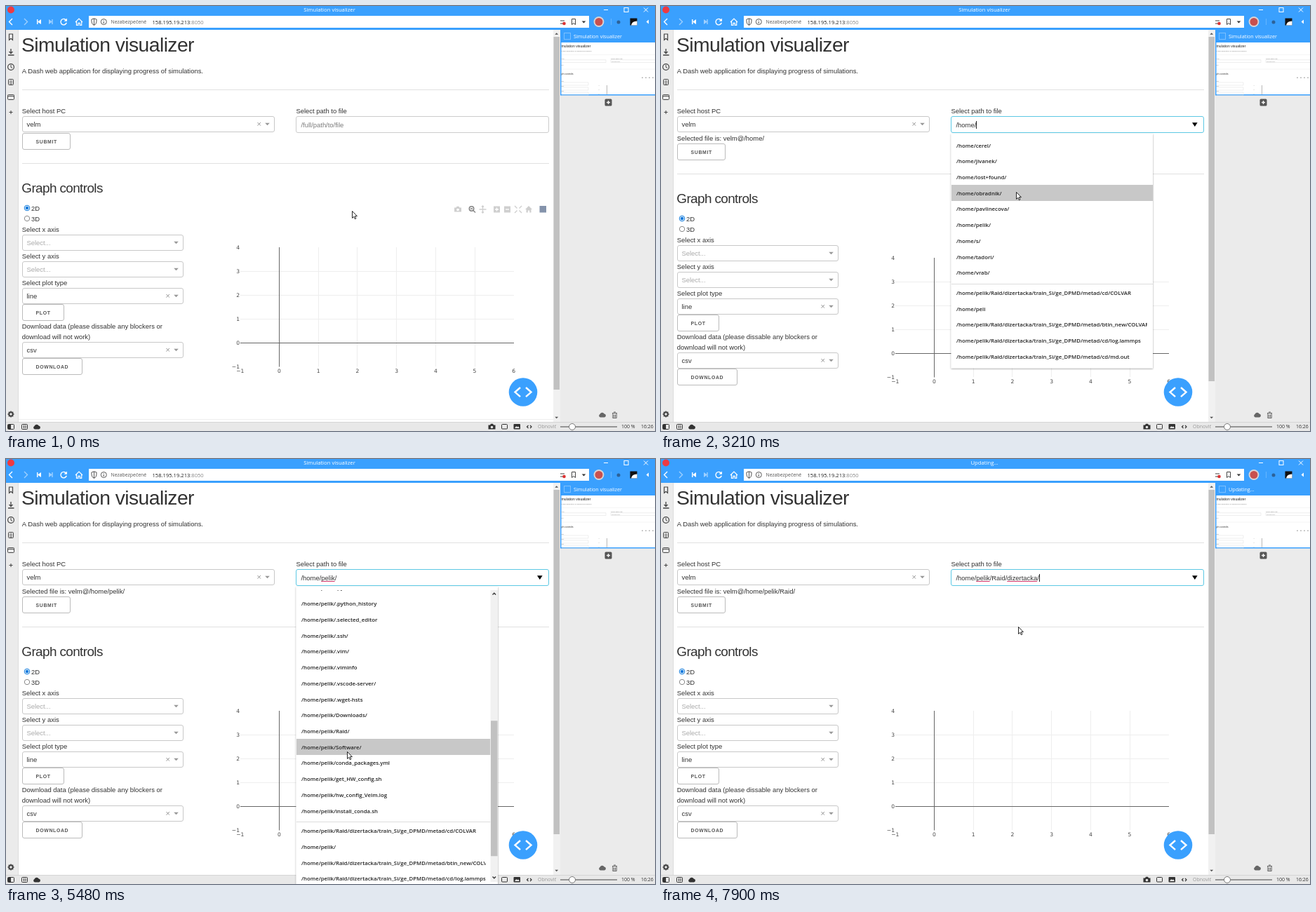
Write an HTML page that moves like this. It is 925 px wide and 606 px high and loops after 8000 ms.

```html
<!DOCTYPE html>
<html lang="en">
<head>
<meta charset="utf-8">
<title>Simulation visualizer</title>
<style>
html, body { margin: 0; width: 100%; height: 100%; overflow: hidden; background: #fff; }
svg { display: block; width: 925px; height: 606px; font-family: "Liberation Sans", Arial, sans-serif; }
.ui { font-family: "Open Sans", "Noto Sans", sans-serif; }
.tick { font-family: "DejaVu Sans", Verdana, sans-serif; }
.btn { font-weight: 700; letter-spacing: .63px; }
</style>
</head>
<body>
<svg id="stage" viewBox="0 0 925 606"></svg>
<script>
const BLUE = '#3aa0fe', INK = '#323232', LOOP = 8000;

// Drawing helpers
const text = (x, y, s, size = 9.44, fill = INK, more = '') =>
  `<text x="${x}" y="${y}" font-size="${size}" fill="${fill}" ${more}>${s}</text>`;
const ui = (x, y, s, size, fill, more = '') => text(x, y, s, size, fill, `class="ui" ${more}`);
const rect = (x, y, w, h, fill, more = '') =>
  `<rect x="${x}" y="${y}" width="${w}" height="${h}" fill="${fill}" ${more}/>`;
const box = (x, y, w, h, stroke = '#c8c8c8', r = 2.5, fill = '#fff') =>
  rect(x, y, w, h, fill, `stroke="${stroke}" rx="${r}"`);
const line = (d, stroke, w = 1) => `<path d="${d}" fill="none" stroke="${stroke}" stroke-width="${w}"/>`;
const fill = (d, color) => `<path d="${d}" fill="${color}"/>`;
const dot = (x, y, r, color, more = '') => `<circle cx="${x}" cy="${y}" r="${r}" fill="${color}" ${more}/>`;
const at = (x, y, s) => `<g transform="translate(${x} ${y})">${s}</g>`;
const down = (x, y, w, color) => fill(`M${x - w} ${y - w / 2}h${2 * w}l${-w} ${w}z`, color);
const up = (x, y, w, color) => fill(`M${x - w} ${y + w / 2}h${2 * w}l${-w} ${-w}z`, color);
const cloud = (x, y, c) => at(x, y, fill('M-3 3.5A2.4 2.4 0 0 1-3.5-1A3.4 3.4 0 0 1 2.7-1.6A2.6 2.6 0 0 1 3 3.5Z', c));
const camera = (x, y, c, hole) => at(x, y, fill('M-5-2.5h2.5l1-1.8h3l1 1.8H5v6H-5Z', c) + dot(0, .5, 1.8, hole));

// File lists
const HOME = '/home/pelik/';
const CD = HOME + 'Raid/dizertacka/train_Si/ge_DPMD/';
const [colvar, logFile, mdOut, btin, curve] =
  ['metad/cd/COLVAR', 'metad/cd/log.lammps', 'metad/cd/md.out', 'metad/btin_new/COLVAR', 'train/lcurve.out'].map(s => CD + s);
const recent = [colvar, HOME, btin, logFile, mdOut, curve];
const LISTS = {
  root: [['/home/'], [colvar, '/home/peli', logFile, HOME, '/home/vrab/vrab/deepmd/Ge/lcurve.out', mdOut]],
  home: ['cerel/ jivanek/ lost+found/ obradnik/ pavlinecova/ pelik/ s/ tadori/ vrab/'.split(' ').map(s => '/home/' + s),
    [colvar, '/home/peli', btin, logFile, mdOut]],
  user: [('.Xauthority .bash_history .bash_logout .bashrc .cache/ .conda/ .condarc .config/ .gitconfig .gnupg/ ' +
    '.ipython/ .keras/ .local/ .nv/ .pbs_qmgr_history .profile .pylint.d/ .python_history .selected_editor .ssh/ ' +
    '.vim/ .viminfo .vscode-server/ .wget-hsts Downloads/ Raid/ Software/ conda_packages.yml get_HW_config.sh ' +
    'hw_config_Velm.log install_conda.sh').split(' ').map(s => HOME + s), recent],
  raid: [['archive/', 'backup/', 'dizertacka/'].map(s => HOME + 'Raid/' + s), recent]
};

// Each step changes only the listed parts of the state
const STEPS = [
  { t: 0, pos: [493, 292], tools: 1, value: '', chosen: '', list: '', hover: -1, scroll: 0 },
  { t: 200, pos: [495, 270] },
  { t: 390, pos: [499, 222], tools: 0 },
  { t: 580, pos: [502, 180], beam: 1, arrow: 1 },
  { t: 770, pos: [502, 171] },
  { t: 1200, focus: 1, caret: 1, list: 'root' },
  { t: 1400, pos: [480, 183], beam: 0 },
  { t: 1600, pos: [464, 193] },
  { t: 1800, pos: [462, 196], hover: 0 },
  { t: 2000, value: '/home/', list: '', hover: -1, busy: 1 },
  { t: 2200, chosen: '/home/' },
  { t: 2410, pos: [475, 182], busy: 0 },
  { t: 2610, pos: [492, 171], beam: 1 },
  { t: 2810, list: 'home' },
  { t: 3010, pos: [503, 229], beam: 0, hover: 1 },
  { t: 3210, pos: [506, 265], hover: 3 },
  { t: 3410, pos: [505, 308], hover: 5 },
  { t: 3610, value: HOME, list: '', hover: -1, busy: 1 },
  { t: 3820, chosen: HOME, pos: [506, 262] },
  { t: 4030, busy: 0, pos: [508, 171], beam: 1 },
  { t: 4240, list: 'user', caret: 0 },
  { t: 4450, pos: [507, 269], beam: 0, hover: 3 },
  { t: 4640, pos: [506, 288], hover: 4 },
  { t: 4840, pos: [500, 330], scroll: 76, hover: 9, caret: 1 },
  { t: 5050, pos: [492, 385], scroll: 190, hover: 16 },
  { t: 5260, pos: [487, 414], scroll: 303, hover: 22, caret: 0 },
  { t: 5480, pos: [486, 417], scroll: 379, hover: 26 },
  { t: 5680, scroll: 432, hover: 28, caret: 1 },
  { t: 5860, pos: [495, 392], hover: 27 },
  { t: 6070, pos: [504, 360], hover: 26 },
  { t: 6290, pos: [508, 336], hover: 25 },
  { t: 6490, value: HOME + 'Raid/', list: '', hover: -1, busy: 1, scroll: 0 },
  { t: 6700, chosen: HOME + 'Raid/', pos: [510, 270] },
  { t: 6910, busy: 0, pos: [510, 205] },
  { t: 7120, pos: [510, 171], beam: 1 },
  { t: 7320, list: 'raid' },
  { t: 7520, pos: [509, 214], beam: 0, hover: 1 },
  { t: 7710, pos: [509, 239], hover: 2 },
  { t: 7900, value: HOME + 'Raid/dizertacka/', list: '', hover: -1, busy: 1 }
];

const pen = document.createElement('canvas').getContext('2d');
pen.font = '9.44px "Liberation Sans", Arial, sans-serif';
const widthOf = s => pen.measureText(s).width;

function select(x, y, w, s, empty) {
  return box(x + .5, y + .5, w, 22) + text(x + 6.5, y + 15, s, 9.44, empty ? '#aaa' : INK) +
    down(x + w - 9.5, y + 11.5, 3.3, '#999') +
    (empty ? '' : line(`M${x + w - 23.5} ${y + 9}l4.4 4.6m0-4.6l-4.4 4.6`, '#888', .9));
}
const button = (y, w, s) => box(23.5, y + .5, w, 23, '#bbb') + text(42.6, y + 15, s, 6.93, '#555', 'class="btn"');

function chart() {
  const xs = i => 389.5 + 55.7 * i, ys = i => 480.5 - 34.1 * i;
  let s = '';
  for (let i = 1; i < 6; i++) s += line(`M${Math.floor(xs(i)) + .5} 344V514`, '#eee');
  for (let i = 1; i < 4; i++) s += line(`M334 ${Math.floor(ys(i)) + .5}H724`, '#eee');
  s += line('M389.5 344V514.5M334 480.5H724', '#666');
  for (let i = -1; i < 7; i++) {
    const n = i < 0 ? '−1' : i;
    s += text(xs(i), 522.7, n, 7.55, '#444', 'class="tick" text-anchor="middle"');
    if (i < 5) s += text(333, ys(i) + 2.8, n, 7.55, '#444', 'class="tick" text-anchor="end"');
  }
  return s;
}

function toolbar() {
  const g = '#cfcfcf';
  return camera(644, 290, g, '#fff') +
    dot(663.5, 289, 3.2, 'none', 'stroke="#858585" stroke-width="1.6"') + line('M666 291.5l3 3M662 289h3', '#858585', 1.4) +
    line('M679.5 285V295M674.5 290H684.5M678 286.5l1.5-1.5 1.5 1.5M678 293.5l1.5 1.5 1.5-1.5', g, 1.3) +
    rect(695, 285.5, 9, 9, g) + line('M697 290h5M699.5 287.5v5', '#fff', 1.3) +
    rect(710, 285.5, 9, 9, g) + line('M712 290h5', '#fff', 1.3) +
    line('M725 285l3.5 3.5M735 285l-3.5 3.5M725 295l3.5-3.5M735 295l-3.5-3.5', g, 1.4) +
    fill('M740 290l5-5 5 5h-1.5v4.5h-2.3v-3h-2.4v3h-2.3V290Z', g) + rect(760.5, 285, 9.5, 9.5, '#8493ab');
}

function form(tools) {
  return button(181, 68, 'SUBMIT') + line('M23 224.5H774', '#e1e1e1') +
    text(22.3, 266, 'Graph controls', 18.9, INK, 'letter-spacing="-.6"') +
    dot(30, 288, 3.8, '#fff', 'stroke="#0a78dc"') + dot(30, 288, 2.3, '#0a78dc') + text(36, 291.7, '2D') +
    dot(30, 303, 3.7, '#fff', 'stroke="#888"') + text(36, 306.7, '3D') +
    text(22.8, 322, 'Select x axis') + select(23, 326, 229, 'Select...', 1) +
    text(22.8, 360, 'Select y axis') + select(23, 364, 229, 'Select...', 1) +
    text(22.8, 398, 'Select plot type') + select(23, 402, 229, 'line') + button(425, 59, 'PLOT') +
    text(22.8, 459.7, 'Download data (please dissable any blockers or') + text(22.8, 474.7, 'download will not work)') +
    select(23, 479, 229, 'csv') + button(502, 85, 'DOWNLOAD') +
    chart() + (tools ? toolbar() : '') + line('M18 589.5H780', '#eee');
}

function dropdown({ list, hover, scroll }) {
  const [items, past] = LISTS[list], n = items.length, row = 22.74;
  const long = list === 'user', right = long ? 690.5 : 701;
  const bottom = long ? 612 : 198 + (n + past.length) * row;
  let s = '';
  [...items, ...past].forEach((name, i) => {
    const y = 198.6 + i * row + (i < n ? 0 : 5.7) - scroll;
    if (y < 170 || y > 620) return;
    if (i === hover) s += rect(414, Math.floor(y - 11.4), right - 414, 23, '#c8c8c8');
    s += ui(421, y + 2.9, name, 7.8, '#222', 'font-weight="600" clip-path="url(#names)"');
  });
  const cut = Math.floor(191.6 + n * row - scroll) + .5;
  s += line(`M414 ${cut}H${right}`, '#ddd');
  let out = rect(413.5, 182, 287.5, bottom - 182, '#fff', 'filter="url(#soft)"') +
    `<clipPath id="names"><path d="M414 187H${long ? 683.5 : 693}V${long ? 603 : 606}H414Z"/></clipPath>` +
    `<clipPath id="rows"><path d="M413 187H702V${long ? 603 : 606}H413Z"/></clipPath><g clip-path="url(#rows)">${s}</g>`;
  if (long) out += rect(690.5, 187, 10.5, 416, '#f1f1f1') + rect(691, 197 + scroll * .465, 9.5, 193, '#c1c1c1') +
    line('M693.5 193.5l2.3-2.3 2.3 2.3M693.5 595.5l2.3 2.3 2.3-2.3', '#333', 1.3);
  return out;
}

function input(s) {
  let out = box(413.5, 157.5, 360, 23, s.focus ? '#5cc8e4' : '#ccc') +
    text(420.5, 173, s.value || '/full/path/to/file', 9.44, s.value ? '#333' : '#7a7a7a');
  for (const word of ['pelik', 'dizertacka']) {
    const i = s.value.indexOf(word);
    if (i > 0) out += line(`M${420.5 + widthOf(s.value.slice(0, i))} 174.5h${widthOf(word)}`, '#d2386c');
  }
  if (s.caret) out += rect(Math.round(420.3 + widthOf(s.value)), 164, 1, 11, '#222');
  return out + (s.arrow ? fill('M757 166.3h7.6l-3.8 5.8z', '#000') : '');
}

function page(s) {
  const shift = s.chosen ? 15 : 0;
  return text(22, 65, 'Simulation visualizer', 28.3, INK, 'letter-spacing="-.57"') +
    text(22.8, 96, 'A Dash web application for displaying progress of simulations.') +
    line('M23 119.5H774', '#e1e1e1') +
    text(22.8, 152.6, 'Select host PC') + select(23, 157, 359, 'velm') + text(413.5, 152.6, 'Select path to file') +
    (s.chosen ? text(22.8, 191.8, 'Selected file is: velm@' + s.chosen) : '') +
    at(0, shift, form(s.tools)) + input(s) +
    rect(780, 34, 10, 559, '#f1f1f1') + rect(780.5, 44, 8.5, shift ? 491 : 503, '#c1c1c1') +
    up(784.7, 39.5, 2.4, '#555') + down(784.7, 587, 2.4, '#555') +
    dot(737, 550.5, 20.3, BLUE) + line('M733 544l-7.5 6.6 7.5 6.6M741 544l7.5 6.6-7.5 6.6', '#fff', 2.4);
}

function topBar() {
  const w = '#fff', dim = '#9fd0ff', k = '#444';
  return rect(0, 0, 925, 34, BLUE) + dot(7, 5.5, 5, '#ee3a43') +
    line('M852 5.5h6M909 2.5l6 6m0-6l-6 6', w) + rect(881, 2.5, 6, 6, 'none', 'stroke="#fff"') +
    line('M9 18l-4.5 4.5L9 27', w, 1.4) + line('M26 18l4.5 4.5L26 27', dim, 1.4) +
    fill('M50 19v7l-5-3.5z', w) + rect(44, 19, 1.4, 7, w) + fill('M61 19v7l5-3.5z', dim) + rect(65.3, 19, 1.4, 7, dim) +
    line('M85.7 20.2A4.2 4.2 0 1 0 86.3 23.8', w, 1.4) + fill('M87 17.5v4.3h-4.3z', w) +
    line('M99 23l5-5 5 5M100.5 22v5.3h2.4v-3h2.4v3h2.4V22', w, 1.2) +
    rect(118, 14, 713, 17, w) + line('M122 19l3.5-1.2 3.5 1.2v3q0 4-3.5 5.5q-3.5-1.5-3.5-5.5zM125.5 18v9', k, .9) +
    dot(139.3, 22.5, 4, 'none', `stroke="${k}" stroke-width=".9"`) + line('M139.3 20v1M139.3 22v3', k, .9) +
    ui(149.5, 25.3, 'Nezabezpečené', 6.9, '#555') +
    ui(208.5, 26.2, '158.195.19.213<tspan fill="#888">:8050</tspan>', 7.6, '#222') +
    line('M790 21h6M790 25h6', k, 1.2) + dot(795.5, 25, 2.3, '#d33') + line('M806.5 18.5h5v8l-2.5-2-2.5 2z', k) +
    down(823.5, 23, 2.8, '#333') + dot(845, 22.5, 7.4, '#d9d4d6') + dot(845, 22.5, 5.5, '#c8504f') +
    line('M862.5 18v9', '#65b5ff') + dot(873, 23, 2.5, '#2d6299') +
    rect(889.5, 17.5, 10, 10, '#111') + fill('M891 27.5q1-6 8.5-6v6z', w) + fill('M916 19.5v6l-3.5-3z', w);
}

function sidePanels() {
  const k = '#444';
  return rect(0, 34, 18, 559, '#ebebeb') + line('M17.5 34V593', '#ddd') +
    line('M4.5 40h5v8.5l-2.5-2.3-2.5 2.3z', k, 1.2) + line('M7 61v6M4.5 65l2.5 2.5 2.5-2.5M3 70h8.5', k, 1.3) +
    dot(7, 87, 4.4, 'none', `stroke="${k}" stroke-width="1.2"`) + line('M7 84v3.3l2 1', k) +
    box(3.5, 104.5, 7, 8, k, 1, 'none') + line('M5 107h4M5 109h4M5 111h4', k, .8) +
    box(2.5, 126.5, 9, 7, k, 1, 'none') + line('M2.5 128.5h9', k) + line('M4.5 151.5h5M7 149v5', k) +
    dot(7, 582, 2.7, 'none', `stroke="${k}" stroke-width="2"`) +
    line('M7 577.5v2M7 584.5v2M2.5 582h2M9.5 582h2M3.8 578.8l1.4 1.4M8.8 583.8l1.4 1.4M10.2 578.8l-1.4 1.4M5.2 583.8l-1.4 1.4', k, 1.4) +
    rect(790, 34, 135, 559, '#ebebeb') + rect(790, 34, 135, 93.5, BLUE) + rect(795.5, 38.5, 9, 9, 'none', 'stroke="#7cc0ff"') +
    thumbnail() + rect(853.5, 132.5, 10, 10, '#555', 'rx="1.5"') + line('M856 137.5h5M858.5 135v5', '#fff', 1.3) +
    cloud(850, 583, '#666') + line('M864 580.5h7M866 579h3M864.8 581v6.5h5.4V581M866.5 582.5v4M868.5 582.5v4', '#555', .9);
}

function thumbnail() {
  const g = '#777';
  let s = rect(791.5, 52, 133.5, 74, '#fff') + text(791.5, 59, 'mulation visualizer', 5.1, '#222') +
    text(791.5, 65, 'h web application for displaying progress', 2.4, g) + line('M792 69.5H925M792 90H925', '#eee', .6) +
    text(791.5, 75.7, 't PC', 2.2, g) + text(862, 75.7, 'Select path to file', 2.2, g) +
    line('M792 76.8h63v3.7h-63M925 76.8h-63v3.7h63', '#ddd', .5) + text(863, 79.7, '/full/path/to/file', 1.9, '#999') +
    text(791.5, 84.5, 'MIT', 1.8, g) + text(791.5, 98, 'ph controls', 3.5, '#333');
  for (let i = 0; i < 4; i++) s += rect(906 + i * 5, 101.5, 2, 1.5, '#bbb');
  for (let i = 0; i < 3; i++) s += text(791.5, 107.5 + i * 7, 'axis', 1.9, g) +
    line(`M792 ${109 + i * 7}h38v4h-38`, '#ddd', .5) + text(844.5, 114 + i * 6, 4 - i, 1.8, g);
  return s + line('M856.5 113V126', '#888', .6);
}

function statusBar() {
  const k = '#333';
  return rect(0, 593, 925, 13, '#e8e8e8') + line('M0 593.5H925', '#d5d5d5') +
    box(2.5, 596.5, 9, 7, k, 1, 'none') + rect(3, 597, 4, 6, k) +
    box(22.5, 596.5, 8, 7, k, 1, 'none') + line('M25.5 598v4M28 598v4', k) + cloud(44, 600, k) +
    camera(692.5, 600, k, '#e8e8e8') + box(706.5, 596.5, 8, 6.5, k, 1, 'none') +
    rect(723.5, 596, 9.5, 7.5, k, 'rx="1"') + fill('M725 602l2.2-3 1.5 1.6 1.3-1.3 2 2.7z', '#e8e8e8') +
    line('M744.5 598l-2 2 2 2M747 598l2 2-2 2', k, 1.2) + ui(758, 602.4, 'Obnoviť', 7, '#999') +
    line('M790 600H871', '#444', 1.2) + dot(807, 600, 4.5, '#fff', 'stroke="#777"') +
    ui(877, 602.4, '100 %', 7, '#333') + ui(905, 602.4, '16:26', 6.9, '#333');
}

function pointer({ pos: [x, y], beam }) {
  return at(x, y, beam ? line('M-2-5.5h1.5l.5.5.5-.5H2M0-5V5M-2 5.5h1.5l.5-.5.5.5H2', '#222', .9)
    : '<path d="M.5.5V10.4L2.8 8.3 4.3 11.7 5.9 11 4.4 7.6H7.4Z" fill="#fff" stroke="#111" stroke-width=".9"/>');
}

const frame = topBar() + sidePanels() + statusBar();
const stage = document.getElementById('stage');
stage.innerHTML = `<defs><filter id="soft" x="-5%" y="-5%" width="110%" height="110%">
  <feDropShadow dx="0" dy="1" stdDeviation="1.2" flood-opacity=".4"/></filter>
  <clipPath id="view"><path d="M18 34H790V593H18Z"/></clipPath></defs>
  ${rect(0, 0, 925, 606, '#fff')}<g clip-path="url(#view)" id="page"></g><g>${frame}</g><g id="over"></g>`;
const pageLayer = document.getElementById('page'), overLayer = document.getElementById('over');

function draw(s) {
  const title = s.busy ? 'Updating...' : 'Simulation visualizer';
  pageLayer.innerHTML = page(s);
  overLayer.innerHTML = ui(461, 8.2, title, 7.7, '#fff', 'text-anchor="middle"') + ui(809, 45.8, title, 7.2, '#fff') +
    (s.list ? dropdown(s) : '') + pointer(s);
}

const start = performance.now();
let shown = -1;
function tick() {
  const now = (performance.now() - start) % LOOP;
  const past = STEPS.filter(s => s.t <= now);
  if (past.length !== shown) {
    shown = past.length;
    draw(Object.assign({}, ...past));
  }
  requestAnimationFrame(tick);
}
tick();
</script>
</body>
</html>
```
